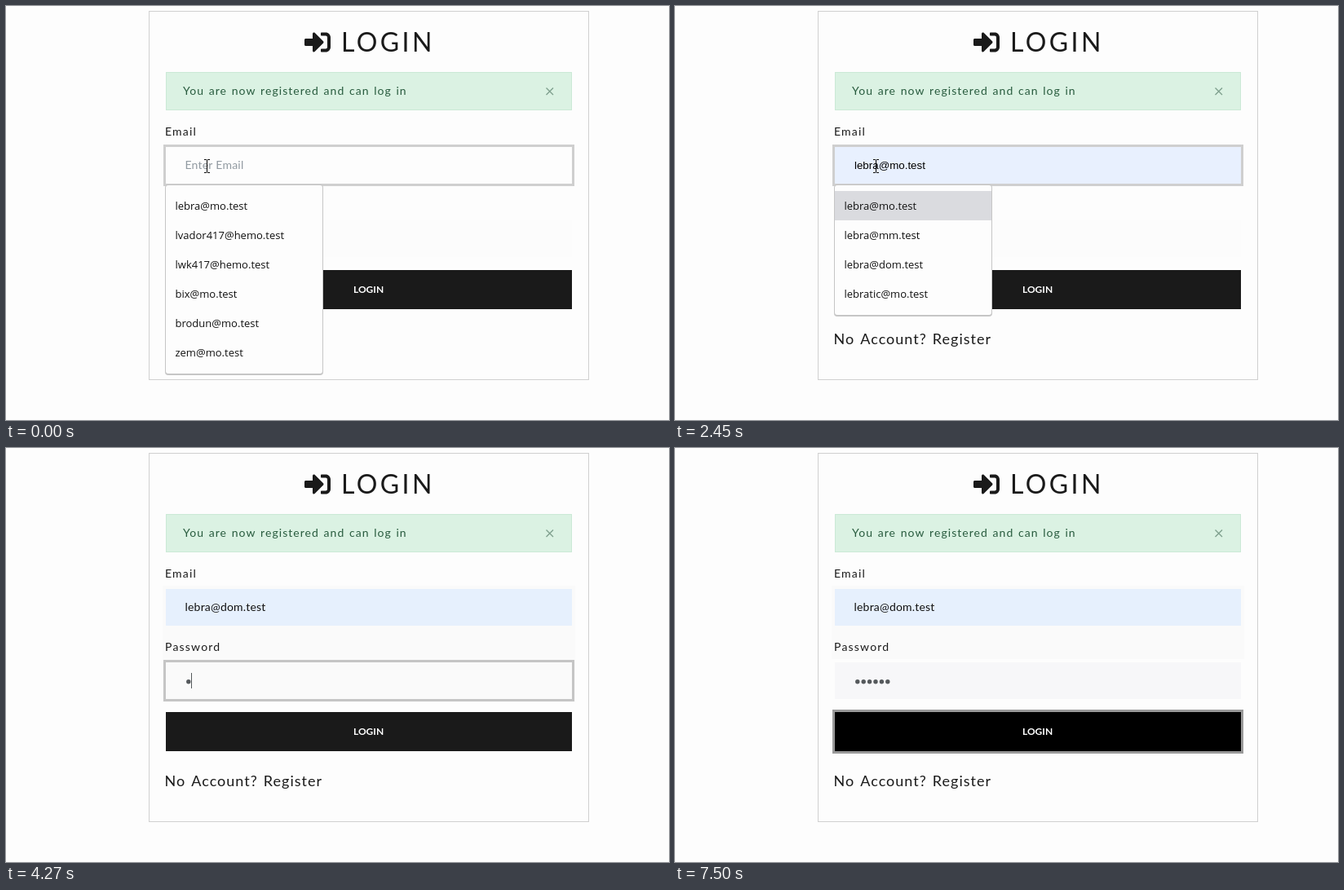
Animation of 813x508 px, one loop 8000 ms. Source, as an HTML page with a canvas:

```html
<!DOCTYPE html>
<html lang="en">
<head>
<meta charset="utf-8">
<title>Login form</title>
<style>
html, body { margin: 0; width: 100%; height: 100%; overflow: hidden; background: #fdfdfd; }
canvas { display: block; }
</style>
</head>
<body>
<canvas id="stage" width="813" height="508"></canvas>
<script>
const ctx = document.getElementById('stage').getContext('2d');
const LOOP = 8000;
const SANS = 'Lato, "Open Sans", sans-serif';
const MENU = '"Open Sans", "Noto Sans", sans-serif';
const PLAIN = '"Liberation Sans", Arial, sans-serif';
const PAGE = '#fdfdfd', INK = '#1a1a1a';

const MATCHES = ['lebra@mo.test', 'lebra@mm.test', 'lebra@dom.test', 'lebratic@mo.test'];
const MIXED = [MATCHES[0], 'lvador417@hemo.test', 'lwk417@hemo.test'];
const RECENT = [...MIXED, 'bix@mo.test', 'brodun@mo.test', 'zem@mo.test'];
const EMAIL = MATCHES[2];

const ICON = new Path2D('M416 448h-84c-6.6 0-12-5.4-12-12v-40c0-6.6 5.4-12 12-12h84c17.7 0 32-14.3 32-32V160c0-17.7-14.3-32-32-32h-84c-6.6 0-12-5.4-12-12V76c0-6.6 5.4-12 12-12h84c53 0 96 43 96 96v192c0 53-43 96-96 96zm-47-209L201 71c-15-15-41-4.5-41 17v96H24c-13.3 0-24 10.7-24 24v96c0 13.3 10.7 24 24 24h136v96c0 21.5 26 32 41 17l168-168c9.3-9.4 9.3-24.6 0-34z');

// Each step adds to the state before it.
const STEPS = [
  [0, { focus: 'email', list: RECENT, typed: '', caret: 0, pick: -1, dots: 0, mouse: true }],
  [580, { caret: 220 }],
  [990, { typed: 'l', caret: 224, list: [...MIXED, ...MATCHES.slice(1)] }],
  [1130, { typed: 'le', caret: 231, list: MATCHES }],
  [1660, { caret: 0 }],
  [2180, { caret: 231 }],
  [2450, { pick: 0, caret: 0 }],
  [2580, { pick: 1 }],
  [2720, { pick: 2 }],
  [3090, { pick: -1, list: null, typed: EMAIL, filled: true, caret: 319 }],
  [3630, { caret: 0 }],
  [3770, { focus: 'moving', mouse: false }],
  [3890, { focus: 'password', caret: 220 }],
  [4270, { dots: 1, caret: 227 }],
  [4920, { caret: 0 }],
  [5060, { dots: 2, caret: 235 }],
  [5350, { dots: 3, caret: 242 }],
  [5640, { dots: 4, caret: 250 }],
  [5770, { dots: 5, caret: 257 }],
  [6320, { caret: 0 }],
  [6470, { dots: 6, caret: 264 }],
  [6900, { caret: 0 }],
  [7500, { focus: 'button' }]
];

function stateAt(t) {
  const s = {};
  for (const [start, change] of STEPS) if (t >= start) Object.assign(s, change);
  return s;
}

function rect(x, y, w, h, color) {
  ctx.fillStyle = color;
  ctx.fillRect(x, y, w, h);
}

function frame(x, y, w, h, color) {
  ctx.strokeStyle = color;
  ctx.lineWidth = 1;
  ctx.strokeRect(x + 0.5, y + 0.5, w - 1, h - 1);
}

function text(str, x, y, font, color, gap = 0, wordGap = 0) {
  ctx.font = font;
  ctx.letterSpacing = gap + 'px';
  ctx.wordSpacing = wordGap + 'px';
  ctx.fillStyle = color;
  ctx.fillText(str, x, y);
}

function label(str, y) {
  text(str, 195, y, '14px ' + SANS, INK, 1.2);
}

function fieldText(str, y, color) {
  text(str, 219.5, y, '14px ' + SANS, color, 0.2);
}

// A 498px wide control with an optional 3px focus ring.
function control(y, h, fill, ring) {
  if (ring) rect(193, y - 3, 504, h + 6, ring);
  rect(196, y, 498, h, fill);
}

function drawHeader() {
  frame(175, 6, 540, 453, '#d0d0d0');
  ctx.save();
  ctx.translate(366, 28.4);
  ctx.scale(1 / 16, 1 / 16);
  ctx.fillStyle = INK;
  ctx.fill(ICON);
  ctx.restore();
  text('LOGIN', 411, 56, '32px ' + SANS, INK, 3.4);

  rect(196, 81, 498, 47, '#dbf2e3');
  frame(196, 81, 498, 47, '#cbe9d6');
  text('You are now registered and can log in', 217, 109, '14px ' + SANS, '#285b3e', 1.05, 1);
  ctx.strokeStyle = '#7fa08e';
  ctx.lineWidth = 1.4;
  ctx.beginPath();
  ctx.moveTo(662.5, 100.5); ctx.lineTo(671, 109);
  ctx.moveTo(671, 100.5); ctx.lineTo(662.5, 109);
  ctx.stroke();
}

function drawEmail(s) {
  const ring = { email: '#cfcfcf', moving: '#e4e4e4' }[s.focus];
  const preview = s.pick >= 0;
  control(173, 45, preview ? '#e8f0fe' : s.filled ? '#e6f0fd' : PAGE, ring);
  if (preview) text(MATCHES[s.pick], 220, 200, '13.333px ' + PLAIN, '#000');
  else if (s.typed) fieldText(s.typed, 200, s.filled ? '#111' : '#55595c');
  else fieldText('Enter Email', 200, '#919aa1');

  if (s.filled && s.focus === 'email') {
    ctx.strokeStyle = '#e53935';
    ctx.lineWidth = 1;
    ctx.beginPath();
    for (let i = 0; i <= 15; i++) ctx.lineTo(220 + i * 2, i % 2 ? 202 : 204);
    ctx.stroke();
  }
}

function drawPassword(s) {
  const ring = { moving: '#e0e0e0', password: '#c5c5c5' }[s.focus];
  const fill = { email: '#fcfcfc', button: '#f7f7f9' }[s.focus] || '#fafafa';
  control(263, 45, fill, ring);
  if (!s.dots) fieldText('Enter Password', 290, '#919aa1');
  ctx.fillStyle = '#55595c';
  for (let i = 0; i < s.dots; i++) {
    ctx.beginPath();
    ctx.arc(223.8 + i * 7.4, 286.7, 2.7, 0, Math.PI * 2);
    ctx.fill();
  }
}

function drawMenu(s) {
  const h = 16 + 36 * s.list.length;
  ctx.beginPath();
  ctx.roundRect(195, 219, 194, h + 2, 4);
  ctx.fillStyle = '#c6c6c6';
  ctx.fill();
  ctx.beginPath();
  ctx.roundRect(196, 220, 192, h - 1, 3);
  ctx.fillStyle = PAGE;
  ctx.fill();
  s.list.forEach((item, i) => {
    const y = 227 + 36 * i;
    if (i === s.pick) rect(196, y, 192, 36, '#dadbdf');
    text(item, 207.5, y + 22.5, '500 13px ' + MENU, '#111');
  });
}

function drawMouse() {
  rect(246, 189, 1, 15, '#000');
  for (const y of [188, 204]) {
    rect(243, y, 3, 1, '#000');
    rect(247, y, 3, 1, '#000');
  }
}

function draw(t) {
  const s = stateAt(t);
  const onEmail = s.focus === 'email';
  rect(0, 0, 813, 508, PAGE);
  drawHeader();
  if (!onEmail) rect(192, 169, 506, s.focus === 'button' ? 90 : 143, '#fafafa');
  label('Email', 159);
  drawEmail(s);
  label('Password', 249);
  drawPassword(s);

  const pressed = s.focus === 'button';
  control(324, 48, pressed ? '#000' : INK, pressed && '#999');
  text('LOGIN', 426, 352, 'bold 12px ' + SANS, '#fff');
  text('No Account? Register', 194.5, 415, '18px ' + SANS, INK, 1, 1.5);

  if (s.list) drawMenu(s);
  if (s.caret) rect(s.caret, onEmail ? 186 : 276, 1, 19, s.filled && onEmail ? '#000' : '#55595c');
  if (s.mouse) drawMouse();
}

const began = performance.now();
function tick() {
  draw((performance.now() - began) % LOOP);
  requestAnimationFrame(tick);
}
tick();
</script>
</body>
</html>
```
